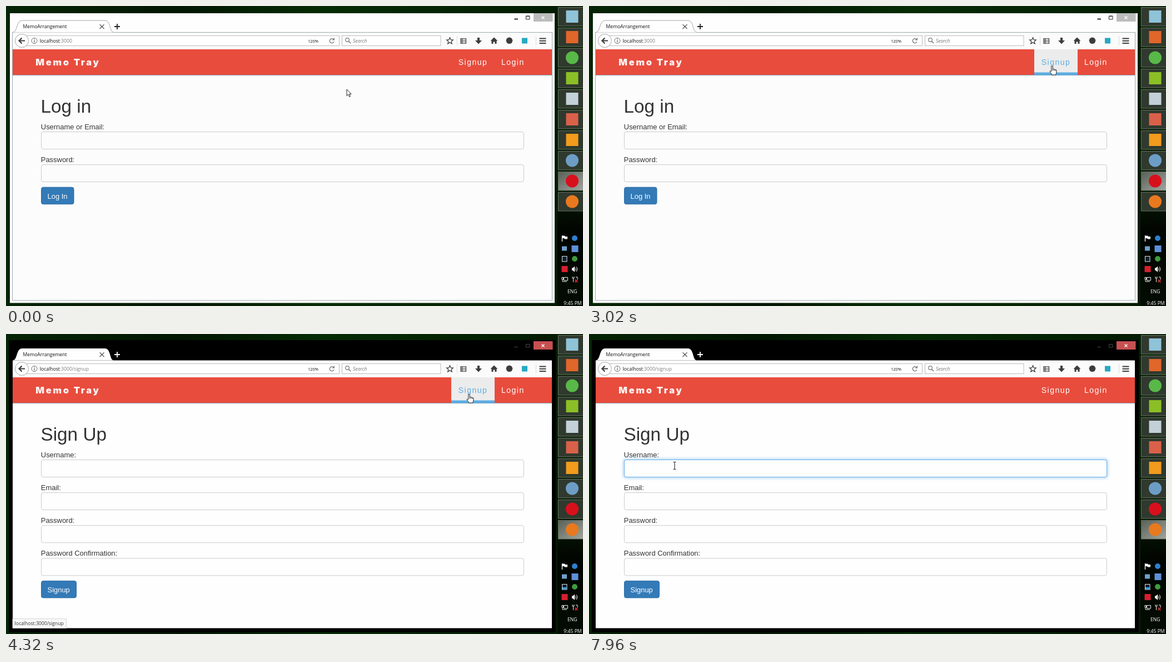
An HTML page that plays this animation: 1038x540 px, repeating every 8 s.

```html
<!DOCTYPE html>
<html lang="en">
<head>
<meta charset="utf-8">
<title>Sign-up walkthrough</title>
<style>
  html, body { margin: 0; width: 100%; height: 100%; overflow: hidden; background: #031300; }
  svg { display: block; width: 1038px; height: 540px; }
  text { font-family: "Liberation Sans", Arial, sans-serif; white-space: pre; }
  .ui { font-family: "Open Sans", "Noto Sans", sans-serif; font-size: 8.65px; }
  .brand { font: 900 16.5px Inter, sans-serif; letter-spacing: 2.7px; }
  .nav { font-size: 14px; letter-spacing: 1.5px; }
  .line { fill: none; stroke: #3c3c3c; stroke-width: 1.6; }
</style>
</head>
<body>
<svg id="stage" viewBox="0 0 1038 540" xmlns="http://www.w3.org/2000/svg"></svg>
<script>
const LOOP = 8000;

const rect = (x, y, w, h, fill, more = '') =>
  `<rect x="${x}" y="${y}" width="${w}" height="${h}" fill="${fill}" ${more}/>`;
const dot = (x, y, r, fill, more = '') => `<circle cx="${x}" cy="${y}" r="${r}" fill="${fill}" ${more}/>`;
const path = (d, more = 'class="line"') => `<path d="${d}" ${more}/>`;
const text = (x, y, s, more = '') => `<text x="${x}" y="${y}" ${more}>${s}</text>`;
const group = (id, body, more = '') => `<g id="${id}" ${more}>${body}</g>`;

// Desktop and taskbar
const desktop = () => `
  <defs>
    <linearGradient id="wall" x2="1" y2="0">
      <stop offset="0" stop-color="#062406"/><stop offset=".3" stop-color="#021602"/>
      <stop offset=".55" stop-color="#052c05"/><stop offset="1" stop-color="#031a02"/>
    </linearGradient>
    <linearGradient id="bar" x2="0" y2="1">
      <stop offset="0" stop-color="#0c2408"/><stop offset=".6" stop-color="#081c05"/>
      <stop offset=".75" stop-color="#010500"/><stop offset="1" stop-color="#030c02"/>
    </linearGradient>
    <linearGradient id="lit" x2="1" y2="1">
      <stop offset="0" stop-color="#596057"/><stop offset="1" stop-color="#a3a8a1"/>
    </linearGradient>
    <filter id="glow" x="-5%" y="-60%" width="110%" height="220%"><feGaussianBlur stdDeviation="2.6"/></filter>
  </defs>
  ${rect(0, 0, 1038, 540, 'url(#wall)')}${rect(992, 0, 46, 540, 'url(#bar)')}`;

const apps = [
  ['s', '#8fc3d8'], ['s', '#e0662a'], ['c', '#58b848'], ['s', '#8cbf26'], ['s', '#c3d0d8'],
  ['s', '#d9614a'], ['s', '#f29b1d'], ['c', '#6d9dc5'], ['c', '#d8101c'], ['c', '#e8791e']
];

const button = i => rect(993.5, 2.5 + 37 * i, 48, 33.5, '#30392e', `id="app${i}" stroke="#667063"`);

const taskbar = () => apps.map(([kind, color], i) => {
  const y = 19 + 37 * i;
  return button(i) + (kind === 'c' ? dot(1018.5, y, 11.5, color) : rect(1007.5, y - 11, 22, 22, color));
}).join('');

const tray = () => `
  ${path('M1000.5 413V424', 'stroke="#fff" stroke-width="1.3"')}
  ${path('M1001 413.5H1005L1006 415H1010V419.5H1005L1004 418H1001Z', 'fill="#fff"')}
  ${dot(1023, 418, 5, '#2f7fd0')}
  ${rect(1000, 432.5, 9, 8, '#6f9fce')}
  ${rect(1017.5, 431, 12, 12, '#5f8fd8')}
  ${rect(1000.5, 450.5, 8.5, 9.5, '#10202c', 'stroke="#dde4e8"')}
  ${rect(1001, 456, 7.5, 3.5, '#3ba0e0', 'id="meter"')}
  ${dot(1023, 455, 5, '#3f9a3c')}
  ${rect(999.5, 468, 11, 11, '#d81f30')}
  ${path('M1018 471.5H1020L1023 468.5V479L1020 476H1018Z', 'fill="#fff"')}
  ${path('M1024.5 471.5Q1026 473.5 1024.5 476M1026 469.5Q1029.5 473.5 1026 478', 'fill="none" stroke="#fff"')}
  ${path('M1000 488.5H1002.5V492H1000ZM1003.5 488.5H1010.5V494H1003.5ZM1001 492V496H1009', 'fill="none" stroke="#eee"')}
  ${path('M1019 487V490H1022V487M1020.5 490V497M1025 488H1028V492', 'fill="none" stroke="#eee"')}
  ${path('M1023.5 492.5L1028.5 497.5M1028.5 492.5L1023.5 497.5', 'stroke="#d33" stroke-width="1.6"')}
  ${text(1010, 517.3, 'ENG', 'class="ui" fill="#fff"')}
  ${text(1003.3, 538.3, '9:45 PM', 'class="ui" fill="#fff"')}`;

// Browser frame
const tab = 'M12 47.5C21 47.5 18 26 29 26H178C189 26 186 47.5 194 47.5';

const frames = () => group('idle',
    rect(7, 13, 980, 521.5, '#fefefe') +
    rect(11.5, 47.5, 971, 482.5, '#fcfcfc', 'stroke="#9fabae"') +
    path(tab, 'fill="#fefefe" stroke="#a5a5a5"') +
    rect(949, 13, 34.5, 15, '#bcbcbc') +
    path('M914.5 23.5H921', 'stroke="#222" stroke-width="2"') +
    path('M935.5 18.5H942V24H935.5ZM935.5 18H942', 'fill="none" stroke="#222"') +
    path('M195 37H205M200 32V42', 'stroke="#222" stroke-width="1.8"')) +
  group('active',
    rect(5, 11, 984, 526, '#000') +
    rect(12, 47.5, 970, 482, '#fefefe') +
    path(tab, 'fill="#fefefe"') +
    rect(949, 13, 34.5, 15, '#c75050') +
    path('M914.5 23.5H921M935.5 18.5H942V24H935.5Z', 'fill="none" stroke="#484848"') +
    path('M195 37H205M200 32V42', 'stroke="#fff" stroke-width="1.8"'));

const toolbar = () => `
  ${path('M963.5 18.5L968.5 23.5M968.5 18.5L963.5 23.5', 'stroke="#fff" stroke-width="1.2"')}
  ${rect(12.5, 48.5, 969, 29, '#fbfbfb')}
  ${text(30.5, 40.2, 'MemoArrangement', 'class="ui" fill="#111"')}
  ${path('M168.5 33.2L176.5 41M176.5 33.2L168.5 41', 'stroke="#444" stroke-width="1.1"')}
  ${rect(34, 53.5, 565.5, 18, '#fff', 'stroke="#bdbdbd"')}
  ${dot(28.5, 62.5, 12, '#fdfdfd', 'stroke="#a8a8a8"')}
  ${path('M34 62.5H24M28.5 57.5L23.5 62.5L28.5 67.5', 'class="line" style="stroke-width:2.2"')}
  ${dot(51, 62.5, 5, 'none', 'stroke="#666"')}
  ${path('M51 61.5V65.5M51 59.2V60.4', 'stroke="#555" stroke-width="1.2"')}
  <text x="60.7" y="66" class="ui" fill="#111">localhost<tspan fill="#7c7c7c">:3000<tspan id="url">/signup</tspan></tspan></text>
  ${text(543, 65.6, '120%', 'class="ui" style="font-size:7.5px" fill="#111"')}
  ${path('M589.3 60A4 4 0 1 0 590 64.3M590.3 57.5V61H586.8', 'fill="none" stroke="#666" stroke-width="1.2"')}
  ${rect(604.5, 53.5, 177.5, 18, '#fff', 'stroke="#bdbdbd"')}
  ${dot(614, 61, 3.3, 'none', 'stroke="#777" stroke-width="1.2"')}
  ${path('M616.5 63.5L620 67', 'stroke="#777" stroke-width="1.6"')}
  ${text(624, 66, 'Search', 'class="ui" font-style="italic" fill="#777"')}
  ${path('M798.5 56.8L800.2 60.7L804.3 61L801.2 63.8L802.2 67.8L798.5 65.6L794.8 67.8L795.8 63.8L792.7 61L796.8 60.7Z', 'class="line" style="stroke-width:1.3"')}
  ${path('M811.5 54V71M953.5 54V71', 'stroke="#ddd"')}
  ${path('M818 58.5H827.5V67.5H818ZM818 61.5H827.5M818 64.5H827.5M820.5 58.5V67.5', 'class="line" style="stroke-width:1.2"')}
  ${path('M848 57H852V62H856L850 68.5L844 62H848Z', 'fill="#3c3c3c"')}
  ${path('M878 56.5L884.5 62.7H882.5V68H879.5V64.5H876.5V68H873.5V62.7H871.5Z', 'fill="#3c3c3c"')}
  ${dot(905.5, 62.3, 5.8, '#3c3c3c')}
  ${rect(928, 57.5, 10, 10, '#27a9c4')}
  ${path('M959.5 58.5H971.5M959.5 62.7H971.5M959.5 67H971.5', 'class="line" style="stroke-width:2"')}`;

// Web page
const navbar = () => `
  ${rect(12, 78, 970, 46, '#e84c3d')}
  ${rect(12, 124, 970, 1, '#8ea0ab')}
  ${text(53.3, 106.7, 'Memo Tray', 'class="brand" fill="#fdf3f2"')}
  ${group('hover', rect(801, 78, 78, 46, '#ececec', 'id="tile"') + rect(801, 119.5, 78, 5, '#5dade2'))}
  ${text(813.7, 106, 'Signup', 'id="link" class="nav"')}
  ${text(891, 106, 'Login', 'class="nav" fill="#fff"')}
  ${rect(12, 78, 97, 3, '#0076ff', 'id="load"')}`;

const form = (id, title, labels, action, width) => {
  const fields = labels.map((label, i) => {
    const y = 226.5 + 59.1 * i;
    return text(62.8, y - 5, label + ':', 'font-size="12.95" fill="#333"') +
      rect(63.5, y, 868, 31, 'none', 'rx="3.5" stroke="#ccc"');
  }).join('');
  const y = 208 + 59.1 * labels.length;
  return group(id,
    text(62.5, 192, title, 'font-size="33.3" fill="#333"') + fields +
    rect(63.5, y, width, 30.5, '#337ab7', 'rx="3.5" stroke="#2e6da4"') +
    text(74.5, y + 20.3, action, 'font-size="12.95" fill="#fff"'));
};

const focus = () => group('focus',
  rect(63.5, 226.5, 868, 31, 'none', 'rx="3.5" stroke="#66afe9" stroke-width="4" opacity=".6" filter="url(#glow)"') +
  rect(63.5, 226.5, 868, 31, '#fefefe', 'rx="3.5" stroke="#66afe9"'));

const status = () => group('status',
  path('M12 512.5H108.5V529.5H12Z', 'fill="#f8f8f8" stroke="#d5d5d5"') +
  text(15.5, 524.3, 'localhost:3000/signup', 'class="ui" fill="#333"'));

const pointers = () =>
  group('arrow', path('M.5 .5V12.2L3.2 9.7L5.2 14L7 13.2L5.1 9H8.6Z', 'fill="#fff" stroke="#222"')) +
  group('hand', path('M-1.2 1Q0-.6 1.2 1V6Q3 5 3.8 6.6Q5.6 5.8 6.2 7.3Q8 6.8 8 8.8V11.5Q7.8 13.5 6.5 16.5H-.3Q-1.5 13.5-4 10.8Q-4.2 8.6-1.2 10.2ZM3.8 6.6V9M6.2 7.3V9.4M1.2 6V9', 'fill="#fff" stroke="#222"')) +
  group('beam', path('M-2.5-6.5H-.5L0-6L.5-6.5H2.5M-2.5 6.5H-.5L0 6L.5 6.5H2.5M0-6V6', 'fill="none" stroke="#222" stroke-width="1.1"'));

const stage = document.getElementById('stage');
stage.innerHTML = desktop() + taskbar() + tray() + frames() + toolbar() + navbar() +
  form('login', 'Log in', ['Username or Email', 'Password'], 'Log In', 58.5) +
  form('signup', 'Sign Up', ['Username', 'Email', 'Password', 'Password Confirmation'], 'Signup', 63) +
  focus() + rect(74.5, 234, 1, 16, '#444', 'id="caret"') + status() + pointers();

// Every step changes part of the state and holds until the next one.
const at = (x, y, pointer = 'arrow') => ({ x, y, pointer });
const steps = [
  [0, { ...at(612.5, 149.5), active: false, hover: false, tile: '#ececec', url: false,
        page: 'login', load: 0, status: false, focus: 0, caret: false }],
  [140, at(610, 148)],
  [420, at(610, 145)],
  [980, at(640, 139)],
  [1100, at(728, 122)],
  [1220, at(794, 115)],
  [1370, at(822, 134)],
  [1500, at(834, 160)],
  [1640, at(835, 171)],
  [2050, at(835, 169)],
  [2480, at(836, 152)],
  [2620, at(834, 130)],
  [2750, { ...at(833, 113, 'hand'), hover: true }],
  [2890, at(833, 107.5, 'hand')],
  [3170, { active: true, tile: '#fefefe' }],
  [3320, { url: true }],
  [3860, { load: 97 }],
  [4020, { load: 118 }],
  [4170, { page: 'signup', load: 970, tile: '#ececec' }],
  [4320, { load: 0, status: true }],
  [4630, { ...at(806, 131), hover: false, status: false }],
  [4770, at(560, 178)],
  [4910, at(290, 222)],
  [5050, at(154, 237, 'beam')],
  [5190, { focus: .5, caret: true }],
  [5330, { focus: 1 }],
  [5740, { caret: false }],
  [6300, { caret: true }],
  [6890, { caret: false }],
  [7440, { caret: true }],
  [7960, { caret: false }]
];

const el = id => document.getElementById(id);
const show = (id, on) => { el(id).style.display = on ? '' : 'none'; };

function draw(t) {
  const s = Object.assign({}, ...steps.filter(([start]) => start <= t).map(step => step[1]));
  show('idle', !s.active);
  show('active', s.active);
  show('meter', s.active);
  el('app8').setAttribute('fill', s.active ? '#30392e' : 'url(#lit)');
  el('app9').setAttribute('fill', s.active ? 'url(#lit)' : '#30392e');
  show('url', s.url);
  show('hover', s.hover);
  el('tile').setAttribute('fill', s.tile);
  el('link').setAttribute('fill', s.hover ? '#5dade2' : '#fff');
  el('load').setAttribute('width', s.load);
  for (const id of ['login', 'signup']) show(id, s.page === id);
  show('status', s.status);
  el('focus').style.opacity = s.focus;
  show('caret', s.caret);
  for (const id of ['arrow', 'hand', 'beam']) {
    show(id, s.pointer === id);
    el(id).setAttribute('transform', `translate(${s.x} ${s.y})`);
  }
}

const origin = performance.now();
function tick() {
  draw((performance.now() - origin) % LOOP);
  requestAnimationFrame(tick);
}
tick();
</script>
</body>
</html>
```
